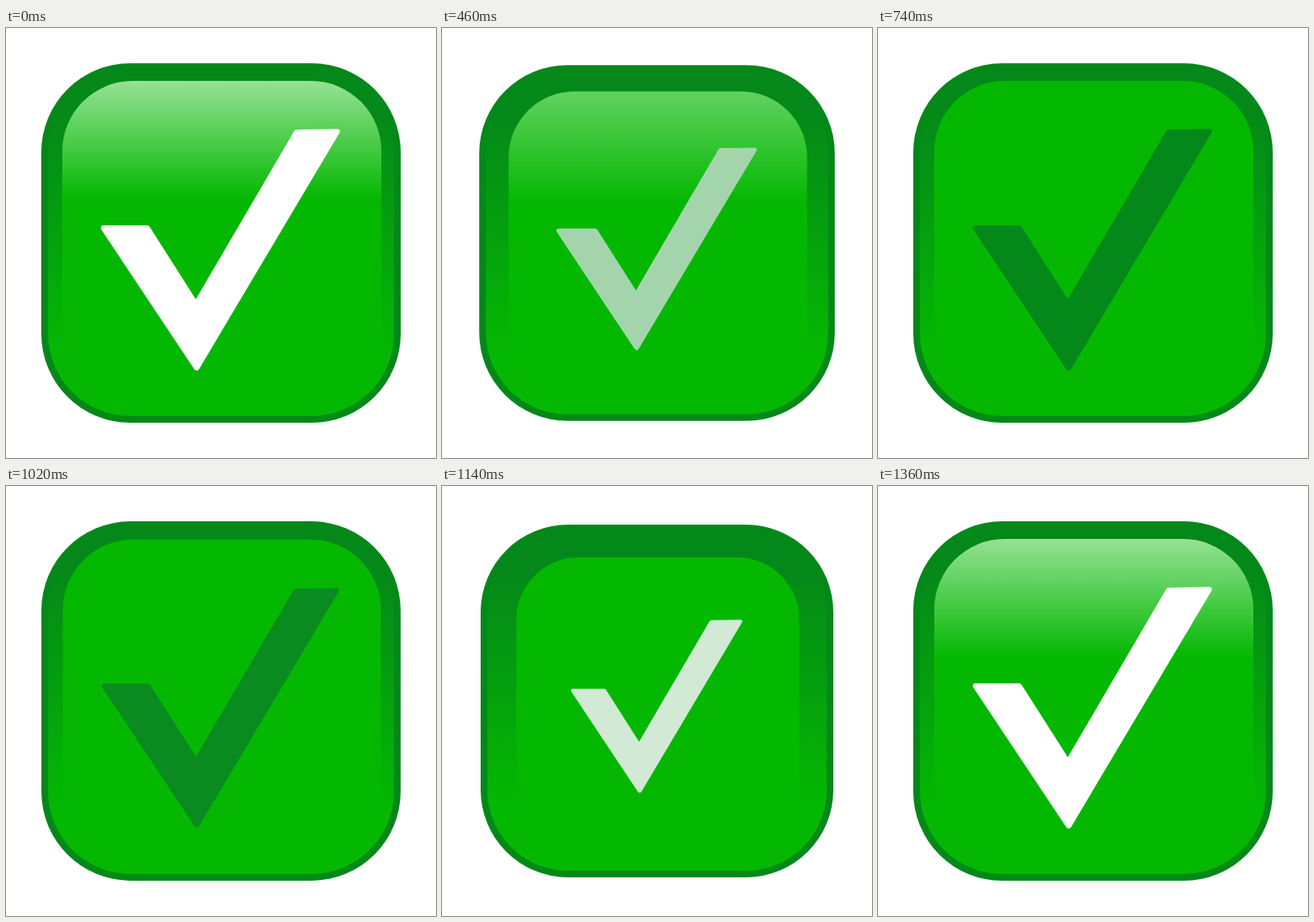
An HTML page for the animation above (2000 ms loop, 512 px wide and 512 px high).

```html
<!DOCTYPE html>
<html lang="en">
<head>
<meta charset="utf-8">
<title>Check button</title>
<style>
  html, body { margin: 0; width: 100%; height: 100%; overflow: hidden; background: #fff; }
  svg { display: block; width: 100%; height: 100%; }
</style>
</head>
<body>
<svg viewBox="0 0 512 512">
  <defs>
    <linearGradient id="bevel" gradientUnits="userSpaceOnUse" x1="0" y1="95" x2="0" y2="385">
      <stop offset="0" stop-color="#048819"/>
      <stop offset="1" stop-color="#04b802"/>
    </linearGradient>
    <linearGradient id="shine" gradientUnits="userSpaceOnUse" x1="0" y1="63" x2="0" y2="204">
      <stop offset="0" stop-color="#fff" stop-opacity=".58"/>
      <stop offset="1" stop-color="#fff" stop-opacity="0"/>
    </linearGradient>
  </defs>
  <g id="base">
    <rect x="42" y="42" width="428" height="428" rx="106" fill="#048819"/>
    <rect x="50" y="50" width="412" height="412" rx="98" fill="url(#bevel)"/>
  </g>
  <g id="face">
    <rect x="67" y="63" width="380" height="386" rx="84" fill="#04b802"/>
    <rect id="gloss" x="67" y="63" width="380" height="386" rx="84" fill="url(#shine)"/>
  </g>
  <path id="check" d="M116 235H168Q170 235 171.2 237L226 323L343 123Q344 121.2 346 121L395 120.2Q399 120.5 397 125L230 406Q227 410 224 406L113.5 240Q111.5 235.5 116 235Z"/>
</svg>
<script>
const LOOP = 2000, STEP = 20, HALF = 180, FADE = 195;
const OFF = 380, ON = 1000;
const GREEN = [4, 136, 25], WHITE = [255, 255, 255];
const [base, face, gloss, check] = ['base', 'face', 'gloss', 'check'].map(id => document.getElementById(id));

const clamp = v => Math.min(1, Math.max(0, v));
const sine = v => (1 - Math.cos(Math.PI * clamp(v))) / 2;

// cubic-bezier(.4, 0, .4, 1), solved by bisection
function ease(x) {
  let low = 0, high = 1;
  for (let i = 0; i < 24; i++) {
    const s = (low + high) / 2;
    if (1.2 * s * (1 - s) + s ** 3 < x) low = s; else high = s;
  }
  return low * low * (3 - 2 * low);
}

const press = age => ease(clamp(1 - Math.abs(age / HALF - 1)));

function scale(el, amount, cx, cy) {
  el.setAttribute('transform', `translate(${cx} ${cy}) scale(${amount}) translate(${-cx} ${-cy})`);
}

function draw(time) {
  const t = Math.floor((time % LOOP) / STEP) * STEP;
  const depth = press(t - OFF) + press(t - ON);
  const white = 1 - sine((t - OFF) / FADE) + sine((t - ON) / FADE);
  const shine = 1 - sine((t - OFF) / FADE) + sine((t - ON - 2 * HALF + FADE) / FADE);

  scale(base, 1 - 0.02 * depth, 256, 256);
  scale(face, 1 - 0.12 * depth, 257, 256);
  scale(check, 1 - 0.3 * depth, 256.5, 257.5);
  gloss.setAttribute('opacity', shine);
  check.setAttribute('fill', `rgb(${GREEN.map((c, i) => Math.round(c + (WHITE[i] - c) * white))})`);
}

const start = performance.now();
function tick() {
  draw(performance.now() - start);
  requestAnimationFrame(tick);
}
tick();
</script>
</body>
</html>
```
